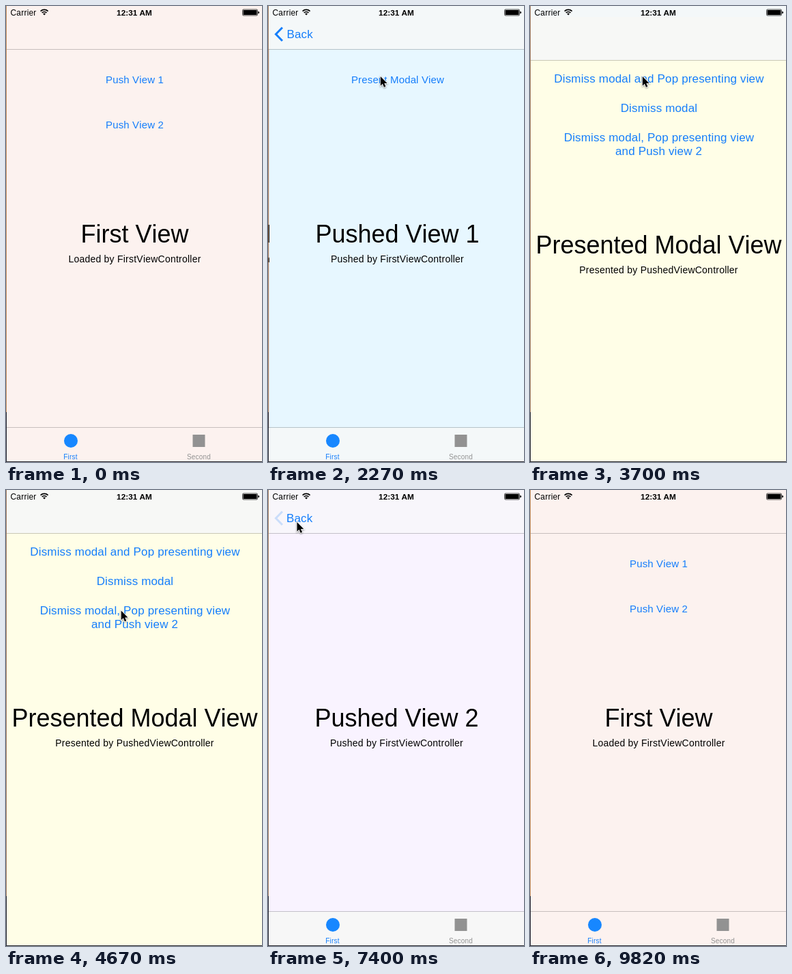
An HTML page that plays this animation: 375x667 px, repeating every 9.92 s.

```html
<!DOCTYPE html>
<html lang="en">
<head>
<meta charset="utf-8">
<title>Push and modal navigation</title>
<style>
  html, body { margin: 0; width: 100%; height: 100%; overflow: hidden; background: #fff; }
  svg { display: block; width: 375px; height: 667px; }
  text { font-family: "Liberation Sans", Arial, sans-serif; font-kerning: none; }
  .mid text { text-anchor: middle; }
  .title { font-size: 36px; }
  .sub { font-size: 14px; letter-spacing: .23px; }
  .link { font-size: 15px; letter-spacing: .15px; fill: #157efb; }
  .big { font-size: 17px; letter-spacing: .16px; fill: #157efb; }
  .tab { font-size: 10px; letter-spacing: .2px; }
  .line { fill: #000; fill-opacity: .21; }
  #cursor { filter: drop-shadow(0 1px 1px rgba(0, 0, 0, .4)); }
</style>
</head>
<body>
<svg viewBox="0 0 375 667">
  <g class="mid">
    <g id="first">
      <rect x="1" width="375" height="667" fill="#fcf2ef"/>
      <text class="link" x="188.5" y="113">Push View 1</text>
      <text class="link" x="188.5" y="179">Push View 2</text>
      <text class="title" x="188.5" y="346">First View</text>
      <text class="sub" x="188.5" y="375">Loaded by FirstViewController</text>
    </g>
    <rect id="shade" x="1" width="375" height="667"/>
    <g id="push1">
      <rect x="1" width="375" height="667" fill="#e7f7ff"/>
      <text class="link" x="189" y="113">Present Modal View</text>
      <text class="title" x="188.5" y="346">Pushed View 1</text>
      <text class="sub" x="188.5" y="375">Pushed by FirstViewController</text>
    </g>
    <g id="push2">
      <rect x="1" width="375" height="667" fill="#f9f3ff"/>
      <text class="title" x="188.5" y="346">Pushed View 2</text>
      <text class="sub" x="188.5" y="375">Pushed by FirstViewController</text>
    </g>
  </g>

  <g id="bars">
    <rect id="navBar" x="1" width="375" height="63"/>
    <rect id="tabBar" x="1" y="617" width="375" height="50"/>
    <rect class="line" x="1" y="63" width="375" height="1"/>
    <rect class="line" x="1" y="616" width="375" height="1"/>
    <path id="chevron" d="M21 31.5 11.5 41.2 21 51" fill="none" stroke="#157efb" stroke-width="3"/>
    <text id="back" class="big" x="27" y="47">Back</text>
    <g class="mid">
      <circle cx="95" cy="636" r="10" fill="#1787ff"/>
      <text class="tab" x="94.5" y="662.5" fill="#157efb">First</text>
      <rect x="273.5" y="627" width="18" height="18" fill="#929292"/>
      <text class="tab" x="282.5" y="662.5" fill="#929292">Second</text>
    </g>
  </g>

  <g id="modal" class="mid">
    <rect x="1" width="375" height="667" fill="#fffee7"/>
    <rect x="1" width="375" height="63" fill="#f7f8f6"/>
    <rect class="line" x="1" y="63" width="375" height="1"/>
    <text class="big" x="189" y="96">Dismiss modal and Pop presenting view</text>
    <text class="big" x="189" y="139">Dismiss modal</text>
    <text class="big" x="189" y="182">Dismiss modal, Pop presenting view</text>
    <text class="big" x="188.5" y="202">and Push view 2</text>
    <text class="title" x="188.5" y="346">Presented Modal View</text>
    <text class="sub" x="188.5" y="375">Presented by PushedViewController</text>
  </g>

  <g id="status">
    <text x="6.5" y="13.5" font-size="12" letter-spacing=".2">Carrier</text>
    <g fill="none" stroke="#000" stroke-width="1.7">
      <path d="M50.6 7.6a8 8 0 0 1 11 0M52.7 9.9a5 5 0 0 1 6.8 0"/>
      <path d="M56.1 13.6 54.2 11.5a2.8 2.8 0 0 1 3.8 0Z" fill="#000" stroke="none"/>
    </g>
    <text x="188" y="13.5" font-size="11.8" font-weight="700" text-anchor="middle">12:31 AM</text>
    <rect x="346.5" y="5" width="22" height="9" rx="1.5" fill="none" stroke="#000" stroke-width=".7"/>
    <rect x="347.5" y="6" width="20" height="7" rx=".6"/>
    <path d="M369.3 7.7a1.8 1.8 0 0 1 0 3.6Z"/>
  </g>

  <rect id="edge" width="1" height="594"/>
  <rect y="594" width="1" height="73" fill="#1c1f2b"/>
  <rect y="666" width="375" height="1" fill="#2c2c33"/>

  <path id="cursor" d="M0 0V13.7L3.1 10.8 5.2 15.7 7.6 14.7 5.5 9.9H9.8Z"
        stroke="#fff" stroke-width="1.6" paint-order="stroke"/>
</svg>
<script>
const LOOP = 9920;
const el = Object.fromEntries([...document.querySelectorAll('[id]')].map(n => [n.id, n]));

// Bar tints: [navigation bar, tab bar]
const TINTS = {
  first: [[252, 242, 239], [252, 242, 239]],
  push1: [[244, 248, 249], [244, 248, 249]],
  push2: [[248, 246, 251], [247, 247, 247]]
};

// Pointer moves: start, end, steps, from, to
const MOVES = [
  [990, 1420, 6, [385, 196], [164.8, 103]],
  [4140, 4670, 7, [164.8, 103], [168.7, 176.5]],
  [6260, 7130, 11, [168.7, 176.5], [42.5, 47]]
];

const mix = (a, b, p) => a + (b - a) * p;
const smooth = p => p * p * (3 - 2 * p);
const stepAt = (t, start, end, n) =>
  Math.min(n - 1, Math.floor((t - start + 5) / ((end - start) / (n - 1))));
const held = (t, start, end, n) => start + stepAt(t, start, end, n) * (end - start) / (n - 1);

// Critically damped settle from 0 to 1
function settle(ms) {
  const x = Math.max(0, ms) * 0.018;
  return 1 - (1 + x) * Math.exp(-x);
}

const show = (node, on) => node.setAttribute('visibility', on ? 'visible' : 'hidden');
const move = (node, x, y) => node.setAttribute('transform', `translate(${x} ${y})`);
const blend = (a, b, p) => `rgb(${a.map((v, i) => Math.round(mix(v, b[i], p)))})`;

// depth: 0 = first view, 1 = pushed view fully on screen
function drawStack(t) {
  const top = t < 5645 ? 'push1' : 'push2';
  let depth = 0, chevron;
  if (t >= 1830 && t < 7400) depth = t < 2360 ? settle(held(t, 1830, 2360, 7) - 1830) : 1;
  else if (t >= 7400 && t < 8190) depth = 1 - settle(held(t, 7400, 8190, 10) - 7400);
  chevron = t >= 7400 ? depth * 0.2 : depth;

  for (const name of ['push1', 'push2']) show(el[name], name === top && depth > 0);
  move(el[top], Math.round(375 * (1 - depth)), 0);
  move(el.first, -112.5 * depth, 0);
  el.shade.setAttribute('opacity', 0.1 * depth);
  ['navBar', 'tabBar'].forEach((bar, i) =>
    el[bar].setAttribute('fill', blend(TINTS.first[i], TINTS[top][i], depth)));
  el.chevron.setAttribute('opacity', chevron);
  el.back.setAttribute('opacity', depth);
  move(el.back, 140 * (1 - depth), 0);
}

function drawModal(t) {
  show(el.modal, t >= 3350 && t < 6000);
  const up = t < 5650
    ? settle(held(t, 3350, 3970, 8) - 3390)
    : 1 - settle(held(t, 5650, 6000, 5) - 5630);
  move(el.modal, 0, Math.round(667 * (1 - up)));
}

function drawCursor(t) {
  show(el.cursor, t >= 990 && t < 9820);
  const leg = MOVES.filter(m => t >= m[0]).pop();
  if (!leg) return;
  const [start, end, n, from, to] = leg;
  const p = smooth((stepAt(t, start, end, n) + 1) / n);
  move(el.cursor, mix(from[0], to[0], p), mix(from[1], to[1], p));
}

function draw(t) {
  drawStack(t);
  drawModal(t);
  drawCursor(t);
  el.edge.setAttribute('fill', t < 1830 || t >= 9820 ? '#c38c5c' : '#a07a5e');
}

const origin = performance.now();
function tick() {
  draw((performance.now() - origin) % LOOP);
  requestAnimationFrame(tick);
}
tick();
</script>
</body>
</html>
```
